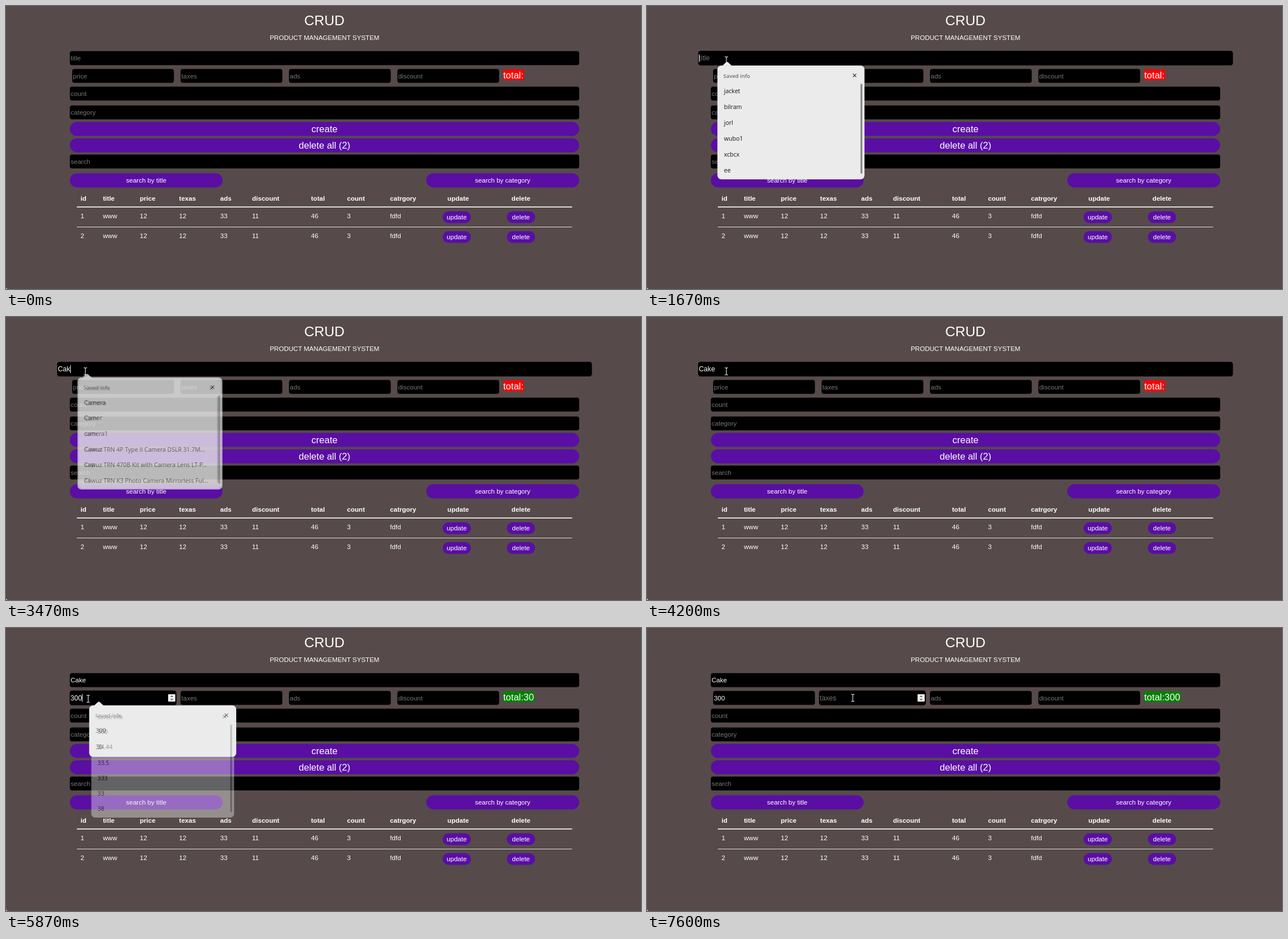
Recreate the animation shown at these times as an HTML page. Size 1120 px wide and 500 px high, loop 8 s.

```html
<!DOCTYPE html>
<html lang="en">
<head>
<meta charset="utf-8">
<title>Product management</title>
<style>
  html, body { margin: 0; width: 100%; height: 100%; overflow: hidden; background: #564b4a; }
  svg { display: block; width: 100%; height: 100%; }
  text { font: 11.55px "Liberation Sans", Arial, sans-serif; fill: #fff; white-space: pre; }
  .big { font-size: 16.55px; }
  .bold { font-weight: 700; }
  .mid { text-anchor: middle; }
  .popup text { font: 10.6px "Open Sans", "Noto Sans", sans-serif; fill: #161616; }
  .popup .head { font-size: 9.4px; font-weight: 600; fill: #6b6b6b; }
</style>
</head>
<body>
<svg id="stage" viewBox="0 0 1120 500"></svg>
<script>
const LOOP = 8000, FPS = 15, BLINK = 530;
const PURPLE = '#5a0ea4';
const stage = document.getElementById('stage');

function el(tag, attrs, parent = stage) {
  const node = document.createElementNS('http://www.w3.org/2000/svg', tag);
  for (const key in attrs) node.setAttribute(key, attrs[key]);
  parent.appendChild(node);
  return node;
}
const rect = (x, y, width, height, rx, fill, parent) =>
  el('rect', { x, y, width, height, rx, fill }, parent);
function label(str, x, y, cls = '', parent = stage) {
  const node = el('text', { x, y, class: cls }, parent);
  node.textContent = str;
  return node;
}
function button(str, x, y, w, h, base, cls = '') {
  rect(x, y, w, h, h / 2, PURPLE);
  label(str, x + w / 2, base, 'mid ' + cls);
}
const show = (node, on) => node.setAttribute('visibility', on ? 'visible' : 'hidden');
const clamp = v => Math.max(0, Math.min(1, v));
const ramp = (t, a, b) => clamp((t - a) / (b - a));
const smooth = p => p * p * (3 - 2 * p);

// Last entry of a [time, value] list that has been reached.
function latest(list, t) {
  let found = null;
  for (const entry of list) if (t >= entry[0]) found = entry;
  return found;
}

// Static page
label('CRUD', 561.5, 34, 'mid').style.fontSize = '24.6px';
label('PRODUCT MANAGEMENT SYSTEM', 561.8, 59.8, 'mid');

const fields = {};
function field(name, x, y, w, numeric) {
  const h = 24.6, g = el('g', {});
  rect(x, y, w, h, 4, '#000', g);
  const text = label(name, x + 1.4, y + 16.3, '', g);
  const caret = rect(x + 1.4, y + 5.8, 1, 13, 0, '#fff', g);
  const spin = el('g', { transform: `translate(${x + w - 14} ${y + 6.2})` }, g);
  rect(0, 0, 12, 12.4, 1, '#efefef', spin);
  el('path', { d: 'M3.4 4.6L6 1.8L8.6 4.6zM3.4 7.8L6 10.6L8.6 7.8z', fill: '#6e6e6e' }, spin);
  fields[name] = { name, x, y, w, h, numeric, g, text, caret, spin };
}
field('title', 112.6, 79.8, 898.4);
['price', 'taxes', 'ads', 'discount'].forEach((name, i) =>
  field(name, 116.7 + 191.2 * i, 111.2, 179.5, true));
field('count', 112.6, 142.5, 898.4);
field('category', 112.6, 175.7, 898.4);
field('search', 112.6, 262.5, 898.4);

const badge = rect(877, 112, 37, 19, 0, '#f00');
const total = label('total:', 877, 127.5, 'big');

button('create', 112.6, 204.8, 898.4, 24.8, 222.8, 'big');
button('delete all (2)', 112.6, 233.7, 898.4, 24.8, 251.8, 'big');
button('search by title', 112.6, 295.6, 269.5, 24.8, 312);
button('search by category', 741.2, 295.6, 269.8, 24.8, 312);

const columns = [['id', 131.6], ['title', 171], ['price', 236], ['texas', 305.3], ['ads', 377.8],
  ['discount', 434], ['total', 538], ['count', 601.6], ['catrgory', 677.3], ['update', 778.6], ['delete', 891.6]];
const cells = ['www', '12', '12', '33', '11', '46', '3', 'fdfd'];
columns.forEach(([name, x]) => label(name, x, 343.6, 'bold'));
rect(125, 354.3, 873.5, 1.6, 0, '#fff');
rect(125, 390, 873.5, 1, 0, '#ddd');
[0, 1].forEach(row => {
  const dy = row * 35;
  [row + 1, ...cells].forEach((v, i) => label(v, columns[i][1], 375 + dy));
  button('update', 770, 362.8 + dy, 50, 20.6, 377.4 + dy);
  button('delete', 883.3, 362.8 + dy, 50, 20.6, 377.4 + dy);
});
el('path', { d: 'M0 496Q0 500 3.5 500H0z', fill: '#fff' });

// Suggestion popups; later lists lie below the one that fades away.
const layer = el('g', {});
const popups = [];
function popup(x, y, items, inAt, inEnd, outAt, outEnd) {
  const w = 259.4, h = items.length > 5 ? 201 : 91;
  const g = el('g', { class: 'popup' });
  layer.prepend(g);
  rect(0, 0, w, h, 7, '#ebebeb', g);
  el('path', { d: 'M8.5 .5L15.5 -6Q17 -7 18.5 -6L25.5 .5z', fill: '#ebebeb' }, g);
  label('Saved info', 10.6, 21.5, 'head', g);
  el('path', { d: 'M239 14.4l6 6m0-6l-6 6', stroke: '#222', 'stroke-width': 1.1 }, g);
  items.forEach((item, i) => label(item, 11.5, 48.7 + 28.1 * i, '', g));
  if (h > 100) rect(252.4, 32, 3.2, 159, 1.6, '#858585', g);
  popups.push({ g, x, y, w, h, inAt, inEnd, outAt, outEnd });
}
const atTitle = (...args) => popup(124.2, 105.3, ...args);
const atPrice = (...args) => popup(146.7, 136.8, ...args);
atTitle(['jacket', 'bilram', 'jorl', 'wubo1', 'xcbcx', 'ee'], 1595, 1670, 2720, 2930);
atTitle(['Camera', 'Cam', 'cam', 'Cawuz', 'cup', 'cc'], 2720, 2860, 3310, 3540);
atTitle(['Camera', 'Camer', 'camera1', 'Cawuz TRN 4P Type II Camera DSLR 31.7M...',
  'Cawuz TRN 470B Kit with Camera Lens LT-P...', 'Cawuz TRN K3 Photo Camera Mirrorless Ful...'],
  3310, 3400, 3410, 3615);
atPrice(['300', '200', '22', '400', '44', '440'], 4640, 4730, 5460, 5670);
atPrice(['300', '34.44', '33.5', '333', '33', '38'], 5460, 5590, 5750, 5960);
atPrice(['300', '30'], 5735, 5860, 5950, 6070);

// Mouse pointer
const arrow = el('path', {
  d: 'M0 0V13.2L3 10.4L5.1 15.2L7.2 14.3L5.1 9.6H9.2z',
  fill: '#fff', stroke: '#000', 'stroke-width': .8
});
const beam = el('path', {
  d: 'M-3 -6.2H-1L0 -5.4L1 -6.2H3M0 -5.4V5.4M-3 6.2H-1L0 5.4L1 6.2H3',
  fill: 'none', stroke: '#f4f4f4', 'stroke-width': 1.1
});

const path = [[65, 1112, 477], [205, 1112, 477], [1000, 108, 74], [1070, 105, 78], [1270, 140, 96],
  [4205, 140, 96], [4470, 145, 125], [6405, 145, 125], [6935, 363, 123.5]];
const focus = [[1600, 'title'], [4670, 'price'], [7070, 'taxes']];
const typed = {
  title: [[2730, 'C'], [3330, 'Ca'], [3400, 'Cak'], [3670, 'Cake']],
  price: [[5400, '3'], [5730, '30'], [5870, '300']]
};
const totals = [[5470, '3'], [5800, '30'], [6070, '300']];

function pointerAt(t) {
  for (let i = 1; i < path.length; i++) {
    const [ta, xa, ya] = path[i - 1], [tb, xb, yb] = path[i];
    if (t < tb) {
      const p = smooth(ramp(t, ta, tb));
      return [xa + (xb - xa) * p, ya + (yb - ya) * p];
    }
  }
  return path[path.length - 1].slice(1);
}

function drawField(f, t, active, hover) {
  const focused = !!active && active[1] === f.name;
  const key = latest(typed[f.name] || [], t);
  const cx = f.x + f.w / 2, cy = f.y + f.h / 2;
  f.g.setAttribute('transform',
    focused ? `translate(${cx} ${cy}) scale(1.05) translate(${-cx} ${-cy})` : '');
  f.text.textContent = key ? key[1] : f.name;
  f.text.style.fill = key ? '#fff' : '#757575';
  show(f.spin, f.numeric && (focused || hover));

  let caretOn = false;
  if (focused) {
    const since = Math.max(active[0], key ? key[0] : 0);
    caretOn = Math.floor((t - since) / BLINK) % 2 === 0;
    f.caret.setAttribute('x', f.x + 1.4 + (key ? f.text.getComputedTextLength() : 0));
  }
  show(f.caret, caretOn);
}

function draw(ms) {
  const t = Math.floor(ms * FPS / 1000) * 1000 / FPS + 5;
  const [px, py] = pointerAt(t);
  const active = latest(focus, t);

  let overField = false;
  for (const f of Object.values(fields)) {
    const hover = px > f.x && px < f.x + f.w && py > f.y && py < f.y + f.h;
    overField = overField || hover;
    drawField(f, t, active, hover);
  }

  const sum = latest(totals, t), digits = sum ? sum[1] : '';
  total.textContent = 'total:' + digits;
  badge.setAttribute('fill', sum ? '#008000' : '#f00');
  badge.setAttribute('width', 36.6 + 9.2 * digits.length);

  for (const p of popups) {
    const a = Math.min(ramp(t, p.inAt, p.inEnd), 1 - ramp(t, p.outAt, p.outEnd));
    const cx = p.w / 2, cy = p.h / 2;
    p.g.setAttribute('opacity', a);
    p.g.setAttribute('transform',
      `translate(${p.x + cx} ${p.y + cy}) scale(${.95 + .05 * a}) translate(${-cx} ${-cy})`);
  }

  const at = `translate(${px} ${py})`;
  arrow.setAttribute('transform', at);
  beam.setAttribute('transform', at);
  show(arrow, t > 65 && !overField);
  show(beam, t > 65 && overField);
}

const start = performance.now();
function tick() {
  draw((performance.now() - start) % LOOP);
  requestAnimationFrame(tick);
}
tick();
</script>
</body>
</html>
```
